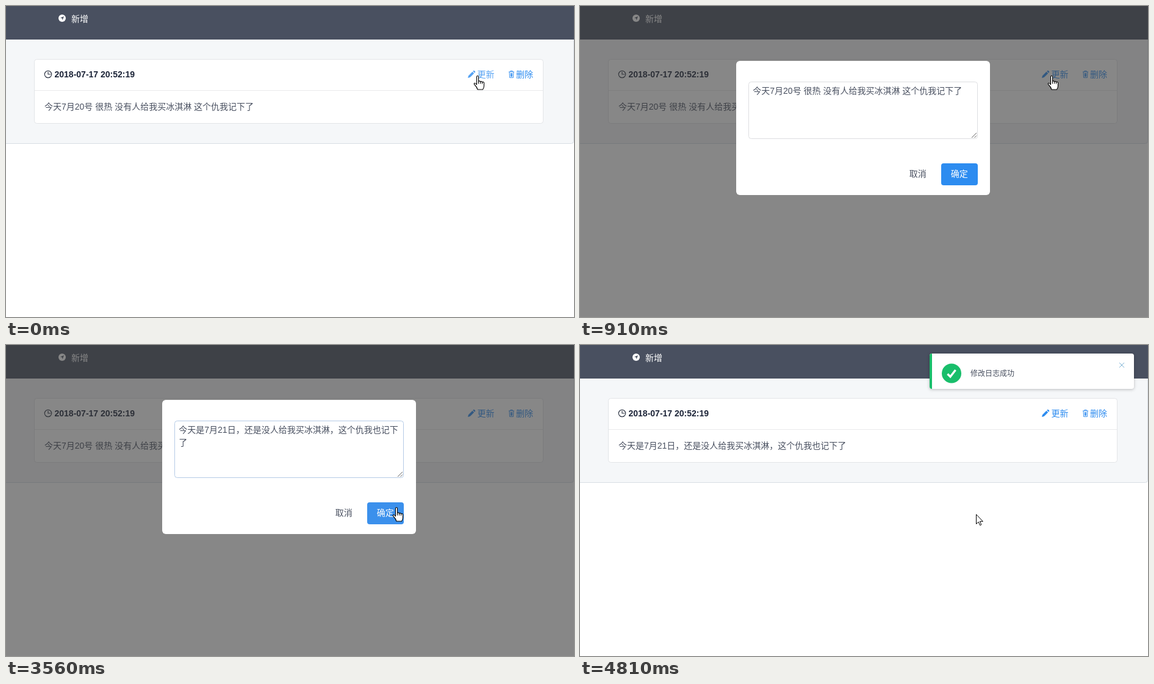
Write an HTML page that moves like this. It is 931x510 px and loops after 5670 ms.

```html
<!DOCTYPE html>
<html lang="zh-CN">
<head>
<meta charset="utf-8">
<title>日志</title>
<style>
html, body { margin: 0; width: 100%; height: 100%; overflow: hidden; background: #fff; }
svg { display: block; width: 931px; height: 510px; }
text { font: 14px "Liberation Sans", "Noto Sans CJK SC", sans-serif; fill: #495060; white-space: pre; }
.title { font-weight: bold; fill: #1c2438; }
.light { fill: #fff; }
.line { fill: none; stroke: currentColor; }
.link { color: #2d8cf0; }
.link text, .solid { fill: currentColor; }

/* The screen refreshes about every 78 ms, so all poses are held. 1% = 56.7 ms */
.anim { animation: 5670ms step-end infinite; }

#update { animation-name: update; }
@keyframes update { 0% { color: #57a3f3 } 9.34%, 100% { color: #2d8cf0 } }

#mask { animation-name: mask; }
@keyframes mask {
  0% { opacity: 0 }
  11.99% { opacity: .223 } 13.4% { opacity: .49 } 14.81% { opacity: .757 } 16.04% { opacity: 1 }
  64.19% { opacity: .73 } 65.6% { opacity: .458 } 66.84% { opacity: .22 } 68.25%, 100% { opacity: 0 }
}

#modal { animation-name: modal; transform-origin: 464px 200px; }
@keyframes modal {
  0% { opacity: 0; transform: scale(.9) }
  11.99% { opacity: .34; transform: scale(.934) }
  13.4% { opacity: .79; transform: scale(.979) }
  14.81% { opacity: .955; transform: scale(.996) }
  16.04% { opacity: 1; transform: none }
  64.19% { opacity: .555; transform: scale(.955) }
  65.6% { opacity: .18; transform: scale(.918) }
  66.84% { opacity: .04; transform: scale(.904) }
  68.25%, 100% { opacity: 0; transform: scale(.9) }
}

#field { animation-name: field; stroke: #dddee1; }
@keyframes field {
  0% { stroke: #dddee1 }
  23.1% { stroke: #cbd5e4 } 24.51% { stroke: #8dbaec } 25.74% { stroke: #57a3f3 }
  61.37% { stroke: #75b0ee } 62.78% { stroke: #b5cbe6 } 64.19%, 100% { stroke: #dddee1 }
}
#glow { animation-name: glow; }
@keyframes glow {
  0% { opacity: 0 } 28.39% { opacity: .5 } 29.8% { opacity: 1 }
  61.37% { opacity: .55 } 62.78%, 100% { opacity: 0 }
}
#ok { animation-name: ok; }
@keyframes ok {
  0% { fill: #2d8cf0 }
  53.26% { fill: #3a94f1 } 54.67% { fill: #4d9df2 } 56.08% { fill: #57a3f3 }
  58.55% { fill: #459aef } 59.96% { fill: #2b85e4 } 61.37% { fill: #3089e8 }
  62.78% { fill: #3b90ec } 64.19%, 100% { fill: #57a3f3 }
}

#draft { animation-name: draft; }
@keyframes draft { 0% { opacity: 1; fill: #495060 } 32.45% { fill: #fff; opacity: 1 } 39.5%, 100% { opacity: 0 } }
#selection { animation-name: selection; }
@keyframes selection { 0% { opacity: 0 } 32.45% { opacity: 1 } 39.5%, 100% { opacity: 0 } }
#edited { animation-name: edited; }
@keyframes edited { 0% { opacity: 0 } 39.5%, 100% { opacity: 1 } }
#caret { animation-name: caret; }
@keyframes caret {
  0% { opacity: 0 }
  28.39% { opacity: 1; transform: translate(626px, 131px) }
  32.45% { opacity: 0 }
  39.5% { opacity: 1; transform: translate(298px, 152px) }
  49.02% { opacity: 0; transform: translate(298px, 152px) }
  58.55% { opacity: 1; transform: translate(298px, 152px) }
  61.37%, 100% { opacity: 0 }
}

#before { animation-name: before; }
@keyframes before { 0% { opacity: 1 } 64.19%, 100% { opacity: 0 } }
#after { animation-name: after; }
@keyframes after { 0% { opacity: 0 } 64.19%, 100% { opacity: 1 } }

#notice { animation-name: notice; filter: drop-shadow(0 1px 2.5px rgba(0, 0, 0, .25)); }
@keyframes notice {
  0% { opacity: 0; transform: translateX(335px) }
  64.19% { opacity: .165; transform: translateX(280px) }
  65.6% { opacity: .63; transform: translateX(130px) }
  66.84% { opacity: .91; transform: translateX(30px) }
  68.25%, 100% { opacity: 1; transform: none }
}

#hand { animation-name: hand; }
@keyframes hand {
  0% { opacity: 1; transform: translate(773px, 114px) }
  17.46% { opacity: 0 }
  53.26% { opacity: 1; transform: translate(638px, 262px) }
  54.67% { opacity: 1; transform: translate(640px, 266px) }
  83.59%, 100% { opacity: 0 }
}
#arrow { animation-name: arrow; }
@keyframes arrow {
  0% { opacity: 0 }
  17.46% { opacity: 1; transform: translate(738px, 124px) }
  18.87% { opacity: 1; transform: translate(676px, 141px) }
  20.28% { opacity: 0 }
  50.44% { opacity: 1; transform: translate(624px, 224px) }
  51.85% { opacity: 1; transform: translate(632px, 246px) }
  53.26% { opacity: 0 }
  83.59% { opacity: 1; transform: translate(645px, 272px) }
  84.83%, 100% { opacity: 1; transform: translate(649px, 277px) }
}
#beam { animation-name: beam; }
@keyframes beam {
  0% { opacity: 0 }
  20.28% { opacity: 1; transform: translate(620px, 160px) }
  21.69% { opacity: 1; transform: translate(602px, 167px) }
  47.61% { opacity: 1; transform: translate(606px, 177px) }
  49.02% { opacity: 1; transform: translate(615px, 200px) }
  50.44%, 100% { opacity: 0 }
}
</style>
</head>
<body>
<svg viewBox="0 0 931 510">
  <!-- page -->
  <rect x="-10" y="-20" width="940.5" height="245.5" rx="4" fill="#f5f7f9" stroke="#d7dde4"/>
  <rect width="931" height="55" fill="#495060"/>
  <circle cx="92" cy="20" r="6" fill="#fff"/>
  <path d="M95 17l-6 2.6 3 .6.6 3z" fill="#495060"/>
  <text class="light" x="107" y="26">新增</text>

  <rect x="46.5" y="87.5" width="834" height="105" rx="4" fill="#fff" stroke="#e3e5e8"/>
  <path d="M47 138.5h833" stroke="#e9eaec"/>
  <g class="line" color="#343b4a" stroke-width="1.2">
    <circle cx="69" cy="112" r="5.7"/>
    <path d="M69 108v4h4.5"/>
  </g>
  <text class="title" x="79.5" y="117">2018-07-17 20:52:19</text>

  <g id="update" class="link anim">
    <path class="solid" d="M757 118l.9-3.6 6.6-6.6 2.7 2.7-6.6 6.6zM765.3 107l1-1q.7-.5 1.3 0l1.4 1.4q.5.6 0 1.3l-1 1z"/>
    <text x="772.5" y="117">更新</text>
  </g>
  <g class="link">
    <path class="line" stroke-width=".9" d="M824 108h9M826.8 108v-1.5h3.4v1.5M825 108l.6 9.5h5.8l.6-9.5M827.2 110l.2 6M828.5 110v6M829.8 110l-.2 6"/>
    <text x="836" y="117">删除</text>
  </g>
  <text id="before" class="anim" x="63" y="170">今天7月20号 很热 没有人给我买冰淇淋 这个仇我记下了</text>
  <text id="after" class="anim" x="63" y="170">今天是7月21日，还是没人给我买冰淇淋，这个仇我也记下了</text>

  <rect id="mask" class="anim" width="931" height="510" fill="#373737" fill-opacity=".6"/>

  <!-- edit dialog -->
  <g id="modal" class="anim">
    <rect x="256" y="90" width="416" height="220" rx="6" fill="#fff"/>
    <rect id="glow" class="anim" x="275" y="123" width="378" height="96" rx="5" fill="none" stroke="#2d8cf0" stroke-opacity=".2" stroke-width="2"/>
    <rect id="field" class="anim" x="276.5" y="124.5" width="375" height="93" rx="4" fill="#fff"/>
    <rect id="selection" class="anim" x="283" y="131" width="344" height="16" fill="#3390ff"/>
    <text id="draft" class="anim" x="283.3" y="144">今天7月20号 很热 没有人给我买冰淇淋 这个仇我记下了</text>
    <g id="edited" class="anim">
      <text x="283.3" y="144">今天是7月21日，还是没人给我买冰淇淋，这个仇我也记下</text>
      <text x="283.3" y="165">了</text>
    </g>
    <rect id="caret" class="anim" width="1" height="16" fill="#222"/>
    <path d="M642 216l8-8M646.5 216l3.5-3.5" stroke="#666"/>
    <text x="539.7" y="280">取消</text>
    <rect id="ok" class="anim" x="592" y="258" width="60" height="36" rx="4"/>
    <text class="light" x="607.7" y="280">确定</text>
  </g>

  <!-- notice -->
  <g id="notice" class="anim">
    <rect x="573" y="14" width="335" height="58" rx="4" fill="#fff"/>
    <path d="M577 14v58q-4 0-4-4V18q0-4 4-4z" fill="#19be6b"/>
    <circle cx="609" cy="46.5" r="16" fill="#19be6b"/>
    <path d="M602.5 47.5l4.5 4.5 8.5-11" fill="none" stroke="#fff" stroke-width="3.4"/>
    <text x="640" y="51" style="font-size:12px">修改日志成功</text>
    <path d="M884 29l8 8M892 29l-8 8" stroke="#7fb3d5"/>
  </g>

  <!-- pointers -->
  <g id="hand" class="anim" fill="#fff" stroke="#000" stroke-width="1.1" stroke-linejoin="round">
    <path d="M-1.5 14V2a1.5 1.5 0 0 1 3 0v7.5q1.5-1.5 3 .5 1.7-1 3 .7 2.5-.8 3 1.3v5q0 3-2 6H0q-1-4-5-8-1.5-2 0-2.5 1.5-.5 3.5 2.5z"/>
    <path d="M1.5 9.5v4M4.5 10v3.5M7.5 10.7v3"/>
  </g>
  <path id="arrow" class="anim" d="M.5.8v15.7l3.6-3.4 2.6 5.6 2.2-1-2.5-5.4h5z" fill="#fff" stroke="#000"/>
  <path id="beam" class="anim" d="M-3 -7.5h2.5l1 1 1-1h2.5M.5 -6.5v14M-3 8.5h2.5l1-1 1 1h2.5" fill="none" stroke="#000"/>
</svg>
</body>
</html>
```
